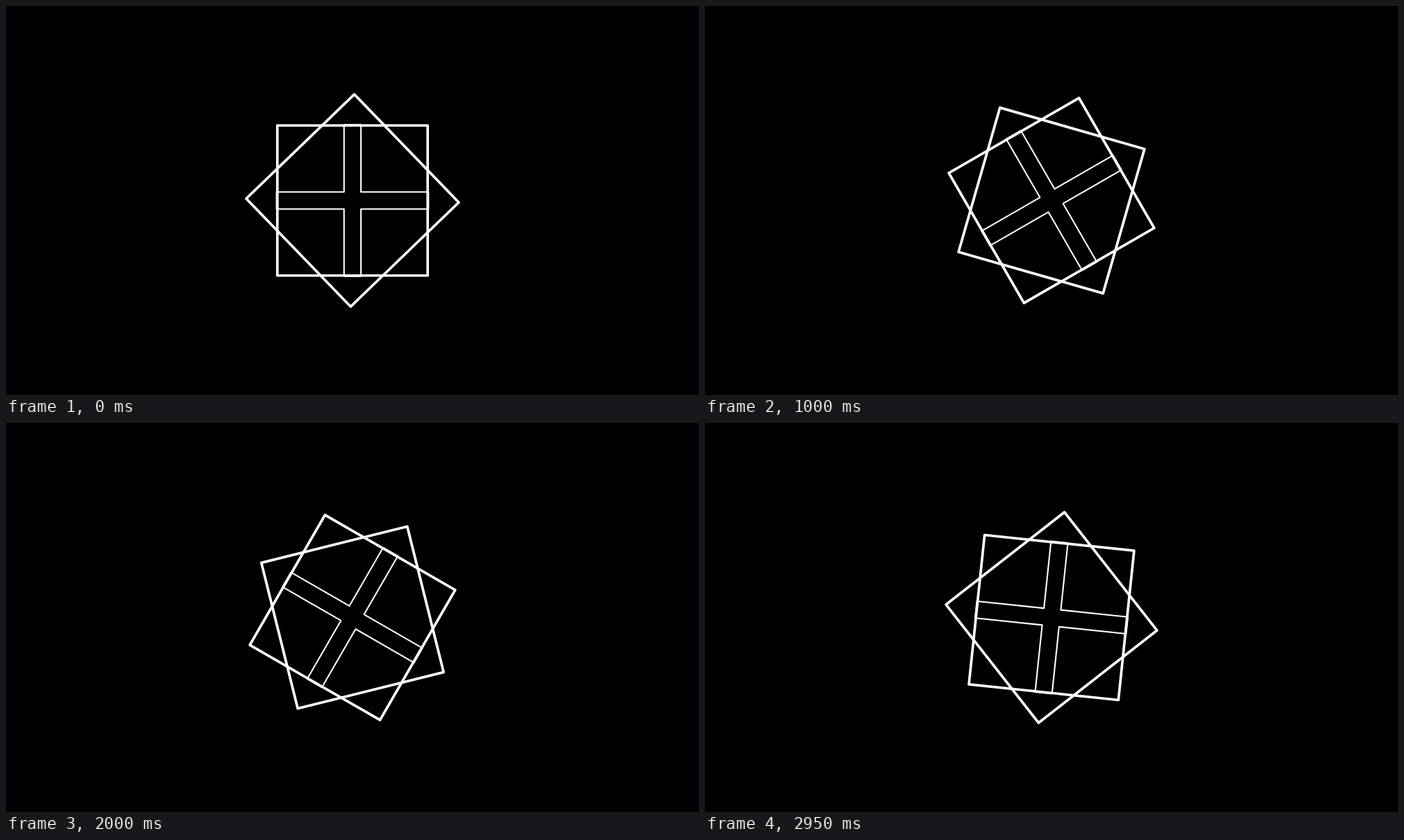
Recreate the animation shown at these times as an HTML page. Size 998 px wide and 561 px high, loop 3000 ms.

```html
<!DOCTYPE html>
<html lang="en">
<head>
<meta charset="utf-8">
<title>Rotating squares</title>
<style>
  html, body { margin: 0; width: 100%; height: 100%; overflow: hidden; background: #000; }
  svg { display: block; width: 998px; height: 561px; }
  g { fill: none; stroke: #fff; stroke-width: 3.7; stroke-linejoin: round; }
  .cross { stroke-width: 2.1; }
</style>
</head>
<body>
<svg viewBox="0 0 998 561">
  <g id="figure">
    <path id="square" d="M-108.25-108.25h216.5v216.5h-216.5z"/>
    <use href="#square" transform="rotate(46)"/>
    <path class="cross" d="M-12.2-109.3h24.4v97.1h97.1v24.4h-97.1v97.1h-24.4v-97.1h-97.1v-24.4h97.1z"/>
  </g>
</svg>
<script>
  const LOOP = 3000, STEP = 50;
  const figure = document.getElementById('figure');

  // One counter-clockwise turn per loop, in steps of 50 ms.
  function draw() {
    const time = performance.now() % LOOP;
    const angle = -360 * Math.floor(time / STEP) * STEP / LOOP;
    figure.setAttribute('transform', `translate(499 280.5) rotate(${angle})`);
    requestAnimationFrame(draw);
  }
  draw();
</script>
</body>
</html>
```
